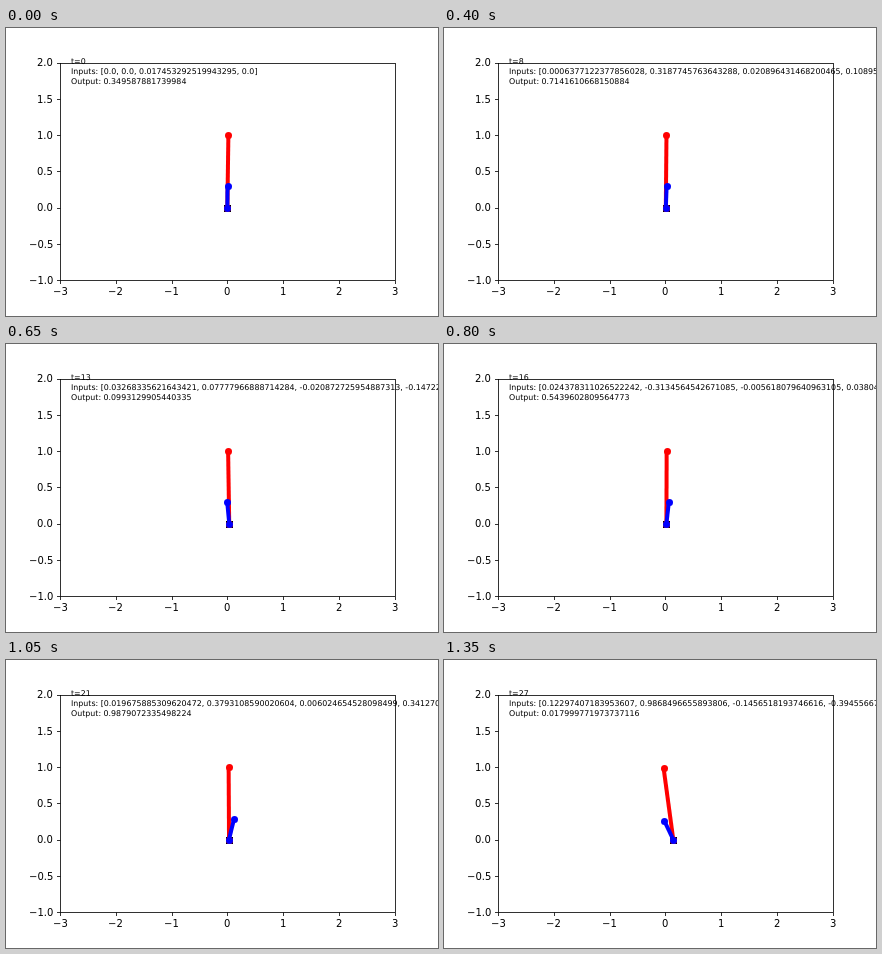
An HTML page with a canvas that plays this animation: 432x288 px, repeating every 1400 ms.

```html
<!DOCTYPE html>
<html lang="en">
<head>
<meta charset="utf-8">
<title>Two poles on a cart</title>
<style>
  html, body { margin: 0; width: 100%; height: 100%; overflow: hidden; background: #fff; }
  canvas { display: block; }
</style>
</head>
<body>
<canvas id="stage" width="432" height="288"></canvas>
<script>
const ctx = document.getElementById('stage').getContext('2d');
const STEP_MS = 50, STEPS = 28;

// --- Simulation ---
// State: cart position and velocity, then angle and angular speed of each pole.
const GRAVITY = 9.8, CART_MASS = 1, MAX_FORCE = 10, HINGE_FRICTION = 2e-6;
const DT = 0.02, SUBSTEPS = 2;
const LONG = { mass: 0.1, half: 0.5 }, SHORT = { mass: 0.01, half: 0.05 };

function control([, v, long, , short]) {
  return 1 / (1 + Math.exp(0.3971 - 0.1189 * v + 12.82 * long - 14.1595 * short));
}

function derivative([, v, long, longSpeed, short, shortSpeed], output) {
  let force = MAX_FORCE * (2 * output - 1), mass = CART_MASS;
  const turns = [[LONG, long, longSpeed], [SHORT, short, shortSpeed]].map(([pole, angle, speed]) => {
    const s = Math.sin(angle), c = Math.cos(angle);
    const pull = GRAVITY * s - HINGE_FRICTION * speed / (pole.mass * pole.half);
    force += pole.mass * (pole.half * speed * speed * s - 0.75 * c * pull);
    mass += pole.mass * (1 - 0.75 * c * c);
    return accel => 0.75 / pole.half * (pull - accel * c);
  });
  const accel = force / mass;
  return [v, accel, longSpeed, turns[0](accel), shortSpeed, turns[1](accel)];
}

// Runge-Kutta integration with the controller output held over the step.
function advance(state) {
  const output = control(state), h = DT / SUBSTEPS;
  const shift = (s, d, k) => s.map((value, i) => value + k * d[i]);
  for (let n = 0; n < SUBSTEPS; n++) {
    const a = derivative(state, output);
    const b = derivative(shift(state, a, h / 2), output);
    const c = derivative(shift(state, b, h / 2), output);
    const d = derivative(shift(state, c, h), output);
    state = state.map((value, i) => value + h / 6 * (a[i] + 2 * b[i] + 2 * c[i] + d[i]));
  }
  return state;
}

const states = [[0, 0, Math.PI / 180, 0, 0, 0]];
while (states.length <= STEPS) states.push(advance(states[states.length - 1]));

// --- Drawing ---
const LEFT = 54, RIGHT = 388.8, TOP = 34.56, BOTTOM = 252;
const toX = x => LEFT + (x + 3) * (RIGHT - LEFT) / 6;
const toY = y => BOTTOM - (y + 1) * (BOTTOM - TOP) / 3;
const snap = n => Math.floor(n + 0.5) + 0.5;
const minus = s => s.replace('-', '\u2212');
const decimal = n => Number.isInteger(n) ? n.toFixed(1) : String(n);

function line(x1, y1, x2, y2) {
  ctx.beginPath();
  ctx.moveTo(x1, y1);
  ctx.lineTo(x2, y2);
  ctx.stroke();
}

function disc(x, y) {
  ctx.beginPath();
  ctx.arc(snap(x), snap(y), 3.5, 0, 2 * Math.PI);
  ctx.fill();
}

// Places text on whole pixels; align 0.5 centres it on x, 1 ends it there.
function label(text, x, baseline, align) {
  const left = x - align * ctx.measureText(text).width;
  ctx.fillText(text, Math.round(left), Math.round(baseline));
}

function drawAxes() {
  ctx.strokeStyle = ctx.fillStyle = '#000';
  ctx.lineWidth = 0.8;
  ctx.font = '10px "DejaVu Sans", sans-serif';
  ctx.strokeRect(snap(LEFT), snap(TOP), snap(RIGHT) - snap(LEFT), snap(BOTTOM) - snap(TOP));
  for (let x = -3; x <= 3; x++) {
    const px = snap(toX(x));
    line(px, 252.5, px, 256);
    label(minus(String(x)), toX(x), 267, 0.5);
  }
  for (let y = -1; y <= 2; y += 0.5) {
    const py = snap(toY(y));
    line(51, py, 54.5, py);
    label(minus(y.toFixed(1)), 47, toY(y) + 3.8, 1);
  }
}

function drawPole(x, angle, length, color) {
  const x1 = toX(x), y1 = toY(0);
  const x2 = toX(x + length * Math.sin(angle)), y2 = toY(length * Math.cos(angle));
  ctx.strokeStyle = ctx.fillStyle = color;
  ctx.lineWidth = 4;
  line(x1, y1, x2, y2);
  disc(x1, y1);
  disc(x2, y2);
}

function drawCart([x, , long, , short]) {
  ctx.fillStyle = '#000';
  ctx.fillRect(snap(toX(x)) - 3.5, snap(toY(0)) - 3.5, 7, 7);
  drawPole(x, long, 1, '#f00');
  drawPole(x, short, 0.3, '#00f');
}

function drawReadout(step, state) {
  const [x, v, long, , short] = state;
  const inputs = [x, v, long, short].map(decimal).join(', ');
  ctx.fillStyle = '#000';
  ctx.font = '7.9px "DejaVu Sans", sans-serif';
  [`t=${step}`, `Inputs: [${inputs}]`, `Output: ${control(state)}`]
    .forEach((text, i) => label(text, toX(-2.8), 36 + 10 * i, 0));
}

let start;
function render(now) {
  start ??= now;
  const step = Math.floor((now - start) / STEP_MS) % STEPS;
  ctx.fillStyle = '#fff';
  ctx.fillRect(0, 0, 432, 288);
  drawAxes();
  // The readout shows the state before the move, the drawing the state after it.
  drawCart(states[step + 1]);
  drawReadout(step, states[step]);
  requestAnimationFrame(render);
}
requestAnimationFrame(render);
</script>
</body>
</html>
```
